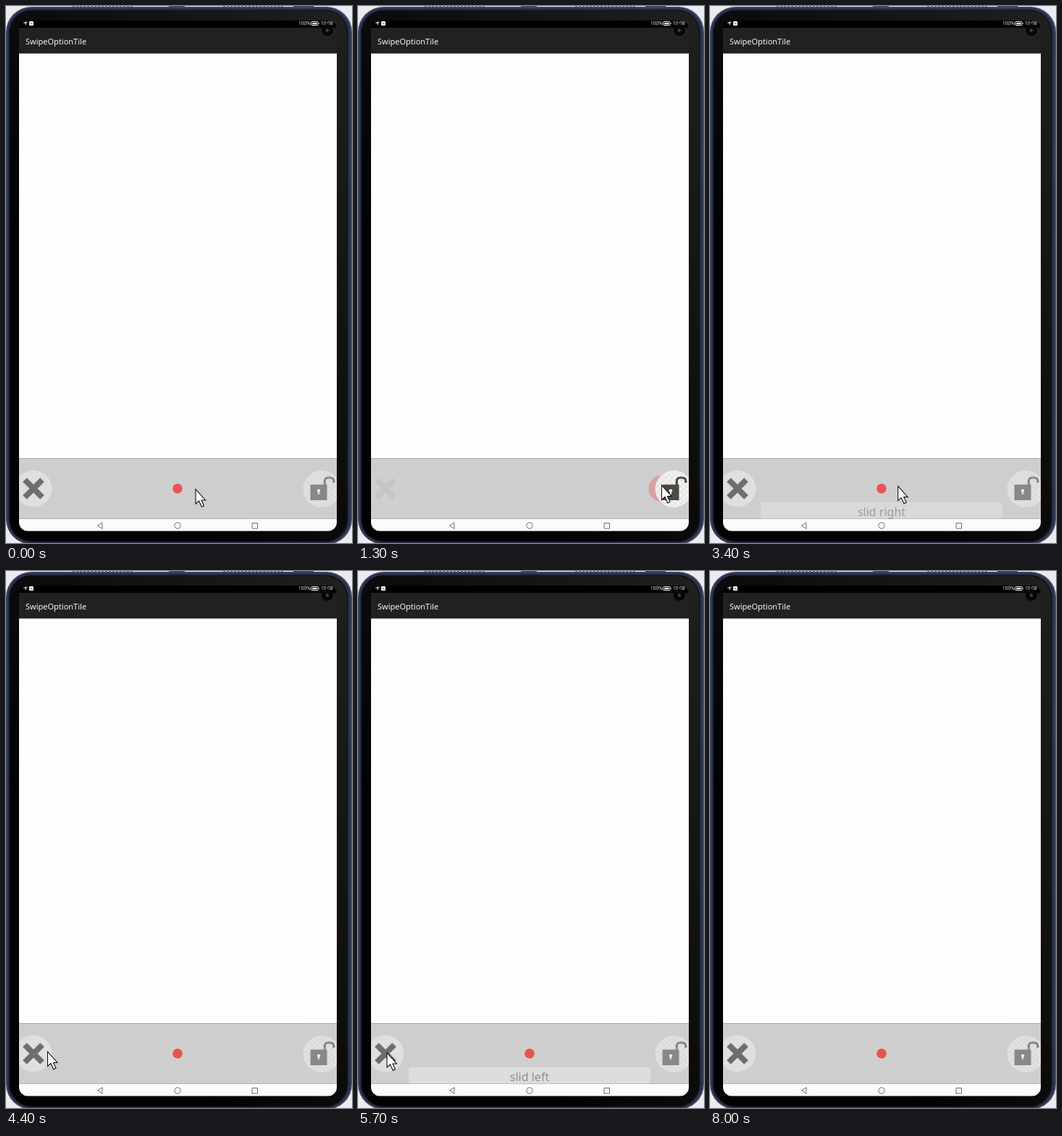
These frames come from a looping animation (478 px wide and 740 px high, 8.1 s). An HTML page:

```html
<!DOCTYPE html>
<html lang="en">
<head>
<meta charset="utf-8">
<title>Slide control</title>
<style>
  html, body { margin: 0; width: 100%; height: 100%; overflow: hidden; background: #e9ebf1; }
  svg { display: block; width: 478px; height: 740px; }
  text { font-family: "Noto Sans", sans-serif; }
</style>
</head>
<body>
<svg viewBox="0 0 478 740">
  <defs>
    <linearGradient id="bezel" x1="0" y1="1" x2="1" y2="0">
      <stop offset=".3" stop-color="#020202"/>
      <stop offset="1" stop-color="#202020"/>
    </linearGradient>
    <pattern id="checker" width="8" height="8" patternUnits="userSpaceOnUse">
      <path fill="#f4f4f1" d="M0 0h8v8H0z"/>
      <path fill="#e8e8e4" d="M0 0h4v4H0zM4 4h4v4H4z"/>
    </pattern>
    <clipPath id="screen"><rect x="18" y="20" width="439" height="703.500" rx="12"/></clipPath>
  </defs>

  <!-- window behind the device -->
  <path d="M92 .5H176M300 .5H385" stroke="#777" stroke-dasharray="3 2"/>
  <path d="M225 .5H247M397 .5H425" stroke="#444"/>

  <!-- device -->
  <rect x="0" y="1" width="478" height="741" rx="35" fill="#444b66"/>
  <rect x="1.500" y="2.500" width="474.500" height="738" rx="33.500" fill="#2b314a"/>
  <rect x="4" y="5.500" width="468.500" height="733" rx="31" fill="#10131f"/>
  <rect x="5.500" y="7" width="465.500" height="730.500" rx="30" fill="url(#bezel)"/>

  <g clip-path="url(#screen)">
    <path fill="#000" d="M18 20h439v10H18z"/>
    <path fill="#212121" d="M18 30h439v36H18z"/>
    <path fill="#fdfdfd" d="M18 65.500h439v558H18z"/>
    <path fill="#cecece" d="M18 623.500h439v83H18z"/>
    <path fill="#fbfbfb" d="M18 706.500h439v18H18z"/>

    <g fill="#eee">
      <path d="M23 23l7-2-3 6-1-3z" fill="#aaa"/>
      <rect x="32" y="21" width="6" height="6" rx="1"/>
      <path d="M33.500 24h3" stroke="#555"/>
      <text x="404" y="26.300" font-size="6.500">100%</text>
      <rect x="421.500" y="21.500" width="9.500" height="5" rx="1" fill="none" stroke="#eee"/>
      <path d="M423 23h6.500v2.200H423zM431.500 23h1v2h-1z"/>
      <text x="435" y="26.300" font-size="6.500">10:08</text>
      <text x="27" y="52.500" font-size="11" fill="#f6f6f6">SwipeOptionTile</text>
    </g>

    <circle id="dot" cx="237" cy="665" r="6.800" fill="#ea5353"/>
    <g id="left">
      <circle cx="38" cy="665" r="25.300" fill="#f1f1ef"/>
      <path d="M26 653l24 24m0-24l-24 24" stroke="#101010" stroke-width="8"/>
    </g>
    <g id="right">
      <circle cx="436" cy="665.500" r="25.500" fill="url(#checker)"/>
      <path d="M440.300 660v-5q0-5 5-5h2.500q5 0 5 5v2" fill="none" stroke="#444" stroke-width="3.200"/>
      <path d="M420.500 659.500h23v21.500h-23z" fill="#444"/>
      <path d="M430.800 668h2.400v5h-2.400z" fill="#eee"/>
      <circle cx="432" cy="668" r="2.300" fill="#fff"/>
    </g>

    <g id="toast" opacity="0">
      <rect x="70" y="684" width="334" height="22.500" rx="4" fill="#fdfdfd"/>
      <text id="message" x="237" y="702.500" font-size="16" text-anchor="middle" fill="#111"></text>
    </g>

    <g fill="none" stroke="#6c6c6c">
      <path d="M126.500 716l6.500-4.300v8.600z"/>
      <circle cx="237" cy="716" r="4.200"/>
      <path d="M340 712.500h7.500v7.500H340z"/>
    </g>
  </g>

  <circle cx="444" cy="33" r="8" fill="#060608"/>
  <circle cx="444" cy="33.500" r="3.200" fill="#171b2c"/>
  <circle cx="444" cy="33.500" r="1.200" fill="#4b557c"/>

  <path id="cursor" d="M0 0V20L4.500 16L8.300 24.200L11.500 22.700L8 15H13.500Z"
        fill="#fff" stroke="#111" stroke-width="1.100"/>
</svg>
<script>
const LOOP = 8100, STEP = 100, CENTER = 237, REACH = 199;

// Each key: time, value(s)
const pointer = [
  [0, 262, 666], [400, 238, 665], [600, 238, 665], [1300, 419.5, 660.5],
  [2700, 419.5, 660.5], [2800, 396, 659.5], [3500, 237, 662], [3900, 237, 662],
  [4400, 57.5, 662.5], [4700, 238, 664], [5000, 238, 664], [5400, 40, 664],
  [7100, 40, 664], [7500, 46, 742], [8100, 46, 742]
];
const toastFade = [
  [0, 0], [2200, 0], [2500, 1], [3100, 1], [3500, 0],
  [5600, 0], [5900, 1], [7100, 1], [7500, 0], [8100, 0]
];
const presses = [[500, 2100], [4900, 5600]];

const el = id => document.getElementById(id);
const [dot, left, right, toast, message, cursor] =
  ['dot', 'left', 'right', 'toast', 'message', 'cursor'].map(el);

function sample(keys, time) {
  const next = keys.findIndex(key => key[0] > time);
  const [from, to] = [keys[next - 1], keys[next]];
  const part = (time - from[0]) / (to[0] - from[0]);
  return from.slice(1).map((value, i) => value + (to[i + 1] - value) * part);
}

function draw(time) {
  const [x, y] = sample(pointer, time);
  const pressed = presses.some(([down, up]) => time >= down && time < up);
  const slide = pressed ? Math.max(-1, Math.min(1, (x - CENTER) / REACH)) : 0;

  dot.setAttribute('cx', CENTER + slide * REACH);
  dot.setAttribute('r', pressed ? 18 : 6.8);
  dot.setAttribute('opacity', Math.min(1, (1 - Math.abs(slide)) * 4.5));
  left.setAttribute('opacity', (1 - slide) / 2);
  right.setAttribute('opacity', (1 + slide) / 2);

  message.textContent = time < 5000 ? 'slid right' : 'slid left';
  toast.setAttribute('opacity', sample(toastFade, time)[0]);
  cursor.setAttribute('transform', `translate(${x} ${y})`);
}

const start = performance.now();
function tick() {
  const time = (performance.now() - start) % LOOP;
  draw(Math.floor(time / STEP) * STEP);
  requestAnimationFrame(tick);
}
tick();
</script>
</body>
</html>
```
